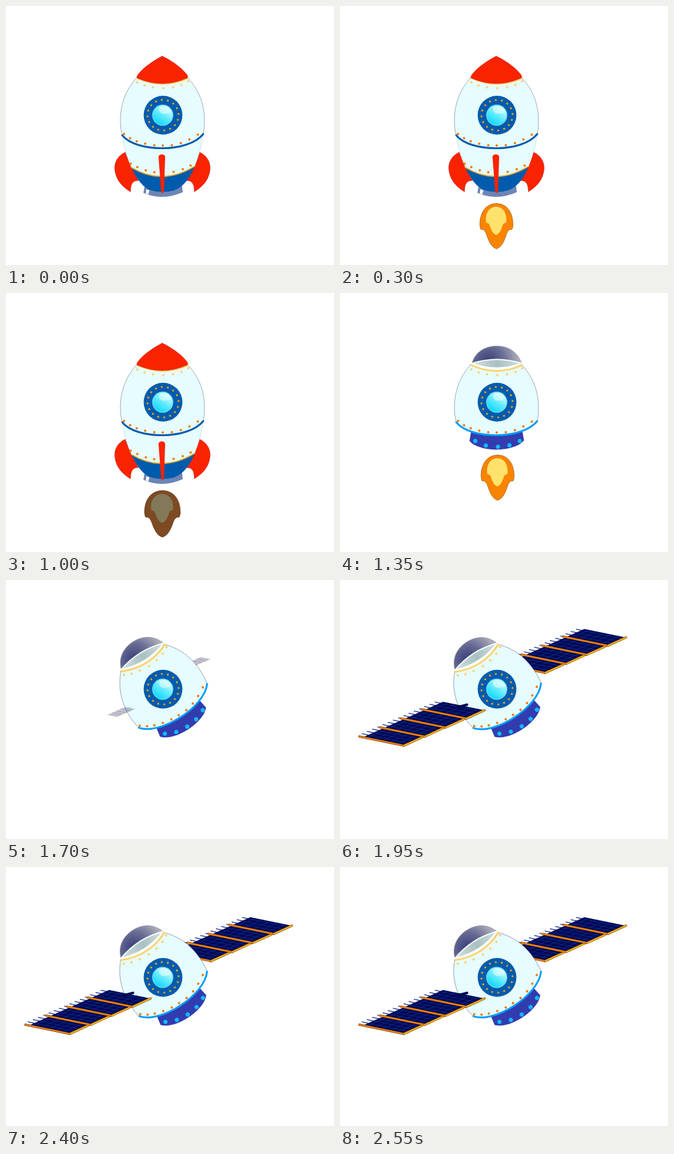
An HTML page with a canvas that plays this animation: 542x427 px, repeating every 2600 ms.

```html
<!DOCTYPE html>
<html lang="en">
<head>
<meta charset="utf-8">
<title>Rocket to satellite</title>
<style>
html, body { margin: 0; width: 100%; height: 100%; overflow: hidden; background: #fff; }
canvas { display: block; width: 542px; height: 427px; }
</style>
</head>
<body>
<canvas id="stage" width="542" height="427"></canvas>
<script>
const ctx = document.getElementById('stage').getContext('2d');
const LOOP = 2600, STEP = 50;
const RED = '#fa2300', BLUE = '#005bad', PALE = '#e6fcff', ORANGE = '#f77a0b';

const progress = (t, from, to) => Math.min(1, Math.max(0, (t - from) / (to - from)));
const smooth = p => p * p * (3 - 2 * p);

function shape(path, fill, stroke, width = 1) {
  const p = new Path2D(path);
  if (fill) { ctx.fillStyle = fill; ctx.fill(p); }
  if (stroke) { ctx.strokeStyle = stroke; ctx.lineWidth = width; ctx.stroke(p); }
}

function disc(x, y, r, fill) {
  ctx.fillStyle = fill;
  ctx.beginPath();
  ctx.arc(x, y, r, 0, Math.PI * 2);
  ctx.fill();
}

const dots = (points, r, fill) => points.forEach(([x, y]) => disc(x, y, r, fill));

function withStops(gradient, ...stops) {
  stops.forEach(([at, color]) => gradient.addColorStop(at, color));
  return gradient;
}

function group(draw, { x = 0, y = 0, sx = 1, sy = 1, alpha = 1 } = {}) {
  if (alpha <= 0) return;
  ctx.save();
  ctx.globalAlpha *= alpha;
  ctx.translate(x, y);
  ctx.scale(sx, sy);
  draw();
  ctx.restore();
}

function rotateAbout(x, y, angle) {
  ctx.translate(x, y);
  ctx.rotate(angle);
  ctx.translate(-x, -y);
}

// Mixes a colour towards dark navy
function dim(rgb, amount) {
  const dark = [2, 16, 68];
  return `rgb(${rgb.map((c, i) => Math.round(c + (dark[i] - c) * amount))})`;
}

function flame(x, y, amount, height) {
  const outline = 'M0 0C18 0 28 16 27.5 36C27 41 26 44 24 43C21 43 19 45 17 50C13 62 9 72 0 75' +
    'C-9 72 -13 62 -17 50C-19 45 -21 43 -24 43C-26 44 -27 41 -27.5 36C-28 16 -18 0 0 0Z';
  group(() => {
    shape(outline, dim([248, 132, 0], amount), 'rgba(60,45,30,.55)', .7);
    group(() => shape(outline, dim([255, 226, 108], amount)), { x: -.5, y: 5.5, sx: .62, sy: .62 });
  }, { x, y, sx: 1 + .16 * amount, sy: height });
}

function sideFin() {
  shape('M197 241C186 246 179 256 179.5 268C181 287 192 298 206 306.5C206 296 208 287 219 288L207 266Z',
    RED, 'rgba(90,20,10,.35)', .6);
}

function lowerStage() {
  shape('M229 297L227 308Q258 322 292 307L291 296Z', '#6c85b5');
  shape('M232 302L237 304L235 311L231 309Z', '#fff');
  shape('M192 213Q197 245 207 266Q258 297 312 264Q322 240 326 211C302 242 215 242 192 213Z',
    PALE, 'rgba(80,90,120,.4)', .5);
  shape('M207 266C215 283 225 299 240 304Q258 309 278 304C294 298 305 282 312 264Q258 297 207 266Z', BLUE);
  shape('M207 266Q258 297 312 264', null, '#eeb02d', 2);
  dots([[206, 260], [217, 265.5], [231, 271], [245, 274], [277, 273.5], [292, 269], [305, 263]], 2, ORANGE);
  shape('M252 249Q252 245 257.5 244.5Q263 245 263 249L261 306Q258.5 311 256.5 306Z', RED);
}

function noseCone() {
  shape('M258 82.5C270 88 288 99 299 113Q302 117 299 119Q258 137 217 119Q215 117 218 113C228 100 244 90 258 82.5Z',
    RED, 'rgba(90,20,10,.4)', .6);
}

function dome() {
  const shade = withStops(ctx.createRadialGradient(245, 113, 4, 245, 113, 52),
    [0, '#3d447c'], [.45, '#686c94'], [1, '#b3b3bc']);
  shape('M218 116C223 98 239 87.5 259 87.5C279 87.5 294 98 300 116Z', shade, '#8d909f', .8);
  const glass = withStops(ctx.createLinearGradient(220, 0, 300, 0),
    [0, '#d2e0df'], [.5, '#aac0c2'], [1, '#d3e1e2']);
  shape('M218 116Q259 103 300 116Q259 131 218 116Z', glass, '#f4ffff', 2);
}

function thruster() {
  shape('M217 226L214 244C230 263 288 263 304 243L301 226Z', '#323cae');
  dots([[223.5, 244], [241, 251.5], [261, 253.5], [280, 251], [297, 244]], 3.5, '#12b7ff');
}

function hull(stripe) {
  shape('M216 118C196 140 189 165 189 190Q189 203 192 213C215 242 302 242 326 211' +
    'Q328 203 328 190C328 165 321 140 300 118Q258 139 216 118Z', PALE, 'rgba(70,80,110,.7)', .7);
  shape('M192 213C215 242 302 242 326 211', null, stripe, 3);
  shape('M217 119Q259 138 301 119', null, '#ffd269', 3);
  dots([[217, 126], [229, 131], [243, 134], [260, 135.5], [276, 134], [290, 130], [301, 124]], 2, '#ffd078');
  dots([[195, 211], [205, 218], [216, 223], [230, 227], [245, 229.5], [259, 230],
    [274, 229.5], [289, 226], [303, 220], [317, 212]], 2, ORANGE);
}

function porthole() {
  const x = 259.5, y = 180;
  disc(x, y, 32, BLUE);
  for (let i = 0; i < 16; i++) {
    const a = i * Math.PI / 8 - 1.65;
    disc(x + 25.7 * Math.cos(a), y + 25.2 * Math.sin(a), 1.7, '#eaa021');
  }
  disc(x - .5, y, 17.5, '#69d8f5');
  disc(x - .5, y, 16, withStops(ctx.createLinearGradient(267, 166, 249, 193),
    [0, '#d6faff'], [.5, '#62ebff'], [1, '#10d9fb']));
  shape('M254 166Q251 174 257 177Q267 179 274 174Q270 163 254 166Z', 'rgba(228,253,255,.6)');
}

// A skewed row of four solar cells starting at its outer lower corner
function solarPanel(x, y) {
  const end = 3.9;
  const at = (u, v) => [x + 34.5 * u + 73.5 * v, y - 14.9 * u + 15 * v];
  const line = (u1, v1, u2, v2, color, width) => {
    const [x1, y1] = at(u1, v1), [x2, y2] = at(u2, v2);
    shape(`M${x1} ${y1}L${x2} ${y2}`, null, color, width);
  };
  const corners = [at(0, .08), at(0, 1), at(end, 1), at(end, .05)];
  shape('M' + corners.map(p => p.join(' ')).join('L') + 'Z', '#030852');
  for (let v = 1; v < 6; v++) line(0, v / 6, end, v / 6, '#0834a0', .7);
  for (let u = .25; u < end; u += .25) {
    line(u, -.06, u, 1, '#0834a0', .7);
    line(u, -.06, u, .13, '#071a72', 1);
  }
  for (let i = 0; i < 4; i++) {
    line(i, 0, i, 1, '#302019', 3.6);
    line(i, 0, i, 1, '#f48108', 2.8);
    line(i, 1, i + .9, .985, '#44300d', 3.6);
    line(i, 1, i + .9, .985, '#ffad0d', 2.6);
  }
}

function growFrom(x, y, scale, draw) {
  group(draw, { x: x * (1 - scale), y: y * (1 - scale), sx: scale, sy: scale, alpha: scale });
}

function draw(t) {
  ctx.clearRect(0, 0, 542, 427);
  const split = smooth(progress(t, 1125, 1325));
  const turn = smooth(progress(t, 1450, 1725));
  const deploy = smooth(progress(t, 1625, 1875));
  const settle = 2 * smooth(progress(t, 1950, 2200));
  const separated = t >= 1150;
  const flicker = Math.sin(Math.PI * (t - 650) / 175) ** 2;

  if (t >= 50 && t <= 1100) {
    const fade = Math.max(1 - progress(t, 0, 300), progress(t, 900, 1100));
    flame(258.5, 325.5, fade, 1 + .04 * flicker + .06 * fade);
  }
  if (t >= 1200 && t < 1550) {
    const fade = Math.max(1 - progress(t, 1150, 1300), progress(t, 1400, 1550));
    flame(260.5, 267, fade, 1 + .04 * flicker);
  }

  ctx.save();
  ctx.translate(0, settle);
  growFrom(300, 140, deploy, () => solarPanel(265.5, 138));

  ctx.save();
  rotateAbout(259.5, 180, -32.5 * Math.PI / 180 * turn);
  if (separated) {
    thruster();
    dome();
  }
  const alpha = 1 - split;
  group(sideFin, { x: -80 * split, y: 70 * split, alpha });
  group(sideFin, { x: 517 + 55 * split, y: 70 * split, sx: -1, alpha });
  group(lowerStage, { y: 120 * split, alpha });
  hull(separated ? '#069cfa' : BLUE);
  group(noseCone, { y: -80 * split, alpha });
  ctx.restore();

  porthole();
  growFrom(205, 212, deploy, () => {
    solarPanel(32, 258);
    shape('M195 209.5L210 205.5', null, '#050b50', 4);
  });
  ctx.restore();
}

function tick(now) {
  draw(Math.floor((now % LOOP) / STEP) * STEP);
  requestAnimationFrame(tick);
}

ctx.lineCap = 'round';
ctx.lineJoin = 'round';
draw(0);
requestAnimationFrame(tick);
</script>
</body>
</html>
```
